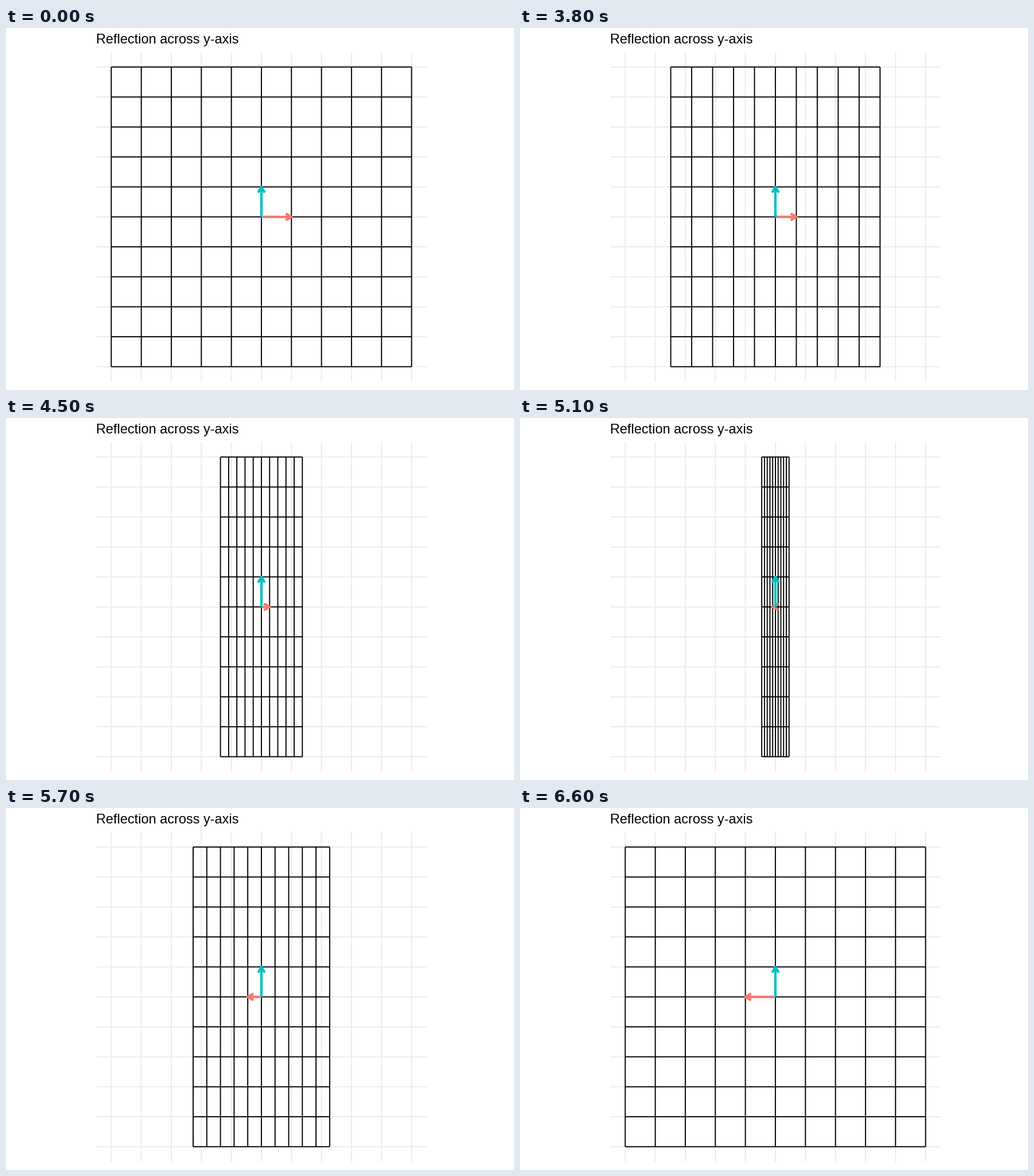
A matplotlib script for the animation above (10 s loop, 885x632 px).

```python
import numpy as np
import matplotlib.pyplot as plt
from matplotlib.animation import FuncAnimation
from matplotlib.collections import LineCollection

W, H, DPI = 885, 632, 64
PT = 72 / DPI                       # points per pixel
CX, CY, UNIT = 444.95, 329.75, 52.32
REACH, PANEL = 5, 5.5               # half extents in grid units
THIN, THICK = 1.9, 4.2
HEAD, HEAD_ANGLE = 11.5, np.radians(30)
FRAMES, HOLD, STEPS = 100, 33, 33

plt.rcParams["path.snap"] = False
fig = plt.figure(figsize=(W / DPI, H / DPI), dpi=DPI, facecolor="white")
ax = fig.add_axes([0, 0, 1, 1])
ax.set(xlim=(0, W), ylim=(H, 0))
ax.axis("off")


def to_px(x, y):
    return CX + UNIT * x, CY - UNIT * y


def grid_segments(extent, x_scale=1):
    ticks = range(-REACH, REACH + 1)
    lines = [[(-extent, k), (extent, k)] for k in ticks]
    lines += [[(k, -extent), (k, extent)] for k in ticks]
    return [[to_px(x * x_scale, y) for x, y in line] for line in lines]


def add_grid(extent, color, z):
    grid = LineCollection(grid_segments(extent), colors=color,
                          linewidths=THIN * PT, capstyle="butt", zorder=z)
    ax.add_collection(grid)
    return grid


class Arrow:
    """Open-headed arrow from the origin."""

    def __init__(self, color, z):
        style = dict(color=color, lw=THICK * PT, zorder=z,
                     solid_capstyle="butt", solid_joinstyle="round")
        self.shaft, = ax.plot([], [], **style)
        self.head, = ax.plot([], [], **style)

    def point_to(self, x, y):
        tip_x, tip_y = to_px(x, y)
        back = np.arctan2(CY - tip_y, CX - tip_x)
        a, b = back - HEAD_ANGLE, back + HEAD_ANGLE
        self.shaft.set_data([CX, tip_x], [CY, tip_y])
        self.head.set_data(
            [tip_x + HEAD * np.cos(a), tip_x, tip_x + HEAD * np.cos(b)],
            [tip_y + HEAD * np.sin(a), tip_y, tip_y + HEAD * np.sin(b)])


add_grid(PANEL, "#EBEBEB", 1)
plane = add_grid(REACH, "black", 2)
i_hat = Arrow("#F8766D", 3)
j_hat = Arrow("#00BFC4", 4)
j_hat.point_to(0, 1)
ax.text(157.2, 27, "Reflection across y-axis", family="Liberation Sans",
        fontsize=23.5 * PT, color="black", va="baseline")


def update(frame):
    step = min(max(frame - HOLD, 0), STEPS)
    scale = 1 - 2 * step / STEPS
    plane.set_segments(grid_segments(REACH, scale))
    i_hat.point_to(scale, 0)
    return plane, i_hat.shaft, i_hat.head


anim = FuncAnimation(fig, update, frames=FRAMES, interval=100,
                     init_func=lambda: update(0), repeat=True, repeat_delay=0)
plt.show()
```
